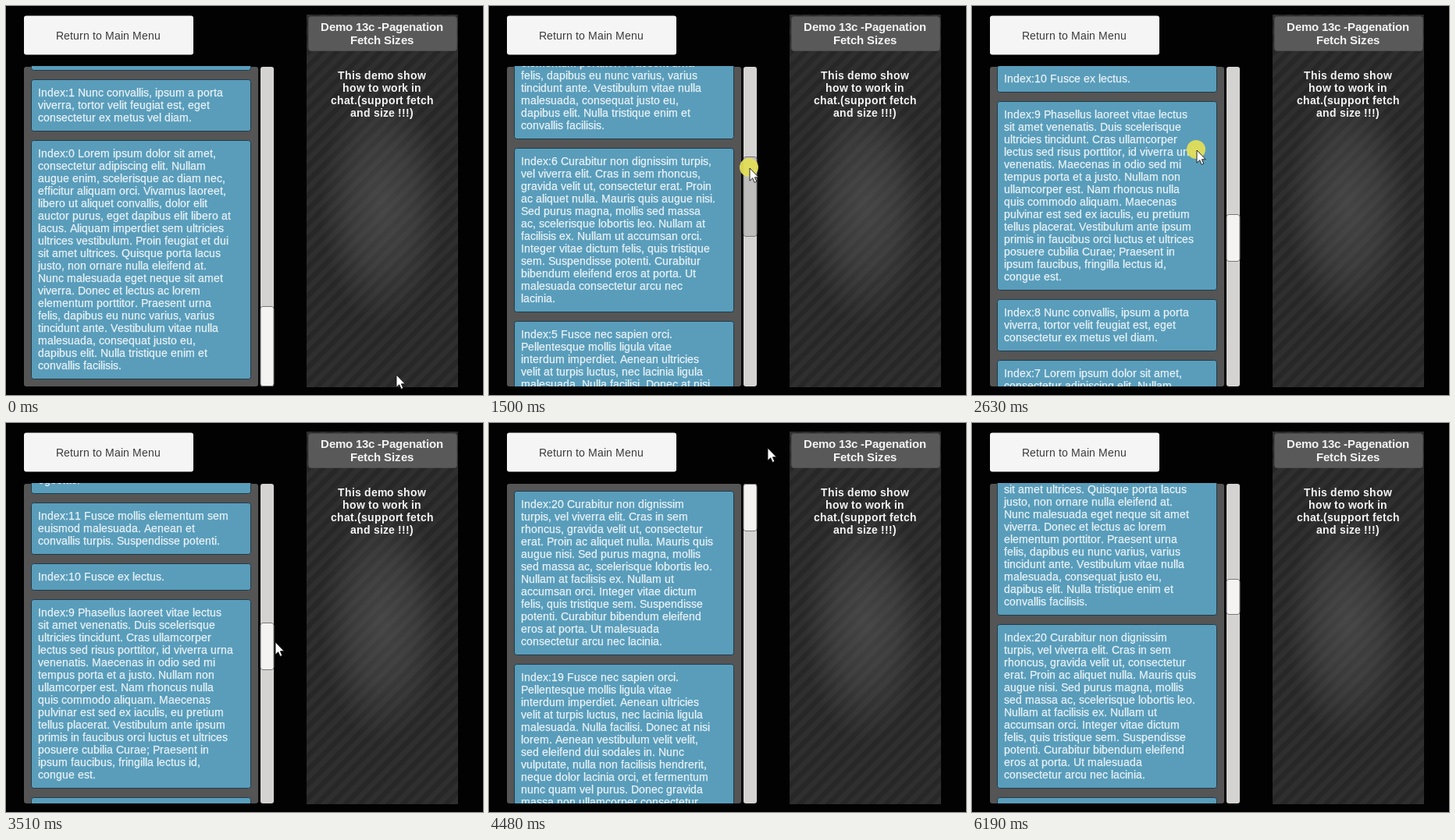
Write an HTML page that moves like this. It is 611 px wide and 499 px high and loops after 6.42 s.

```html
<!DOCTYPE html>
<html lang="en">
<head>
<meta charset="utf-8">
<title>Chat list with paged fetching</title>
<style>
  html, body { margin: 0; width: 100%; height: 100%; overflow: hidden; background: #020202; }
  svg { display: block; width: 611px; height: 499px; }
  text { font-family: "Liberation Sans", Arial, sans-serif; font-variant-ligatures: none; font-kerning: none; }
  .card rect { fill: #599dbb; stroke: #1f3c4a; }
  .card text { fill: #e9f2f6; stroke: #e9f2f6; stroke-width: .25; }
</style>
</head>
<body>
<svg id="stage" viewBox="0 0 611 499">
  <defs>
    <clipPath id="view"><rect x="23" y="77" width="300" height="411" rx="3"/></clipPath>
    <pattern id="stripes" width="13" height="13" patternUnits="userSpaceOnUse" patternTransform="rotate(-45)">
      <rect width="13" height="13" fill="#2f2f2f"/>
      <rect width="13" height="6.5" fill="#272727"/>
    </pattern>
    <radialGradient id="glow">
      <stop offset="0" stop-color="#666" stop-opacity=".46"/>
      <stop offset=".5" stop-color="#666" stop-opacity=".3"/>
      <stop offset="1" stop-color="#666" stop-opacity="0"/>
    </radialGradient>
  </defs>
  <rect width="611" height="499" fill="#020202"/>
  <rect x="23" y="12.5" width="217" height="50" rx="3" fill="#f5f5f5"/>

  <rect x="385" y="11" width="194" height="478" fill="url(#stripes)"/>
  <ellipse cx="482" cy="255" rx="80" ry="155" fill="url(#glow)"/>
  <rect x="387.5" y="13.5" width="190" height="44" rx="3" fill="#595959" stroke="#4c4c4c"/>

  <rect x="23" y="78" width="300" height="410" rx="3" fill="#555"/>
  <g clip-path="url(#view)"><g id="list"></g></g>

  <rect x="326" y="78" width="17" height="410" rx="3" fill="#d5d3d1"/>
  <rect id="handle" x="326" width="17" rx="3" stroke="#777"/>

  <g id="cursor">
    <circle id="press" cx="-1" cy="-1" r="12" fill="#e2de58" fill-opacity=".95"/>
    <path d="M0 0V16.2L3.7 12.8L6.2 18.4L8.8 17.2L6.4 11.8H11.3Z" fill="#fff" stroke="#111" stroke-width=".9"/>
  </g>
</svg>
<script>
const LOOP = 6420, STEP = 64, VIEW_TOP = 78, VIEW_H = 410, LINE = 16, WRAP = 250;
const FIRST_PAGE = 10, FETCH = 11;

const messages = [
  "Lorem ipsum dolor sit amet, consectetur adipiscing elit. Nullam augue enim, scelerisque ac diam nec, efficitur aliquam orci. Vivamus laoreet, libero ut aliquet convallis, dolor elit auctor purus, eget dapibus elit libero at lacus. Aliquam imperdiet sem ultricies ultrices vestibulum. Proin feugiat et dui sit amet ultrices. Quisque porta lacus justo, non ornare nulla eleifend at. Nunc malesuada eget neque sit amet viverra. Donec et lectus ac lorem elementum porttitor. Praesent urna felis, dapibus eu nunc varius, varius tincidunt ante. Vestibulum vitae nulla malesuada, consequat justo eu, dapibus elit. Nulla tristique enim et convallis facilisis.",
  "Nunc convallis, ipsum a porta viverra, tortor velit feugiat est, eget consectetur ex metus vel diam.",
  "Phasellus laoreet vitae lectus sit amet venenatis. Duis scelerisque ultricies tincidunt. Cras ullamcorper lectus sed risus porttitor, id viverra urna venenatis. Maecenas in odio sed mi tempus porta et a justo. Nullam non ullamcorper est. Nam rhoncus nulla quis commodo aliquam. Maecenas pulvinar est sed ex iaculis, eu pretium tellus placerat. Vestibulum ante ipsum primis in faucibus orci luctus et ultrices posuere cubilia Curae; Praesent in ipsum faucibus, fringilla lectus id, congue est.",
  "Fusce ex lectus.",
  "Fusce mollis elementum sem euismod malesuada. Aenean et convallis turpis. Suspendisse potenti.",
  "Fusce nec sapien orci. Pellentesque mollis ligula vitae interdum imperdiet. Aenean ultricies velit at turpis luctus, nec lacinia ligula malesuada. Nulla facilisi. Donec at nisi lorem. Aenean vestibulum velit velit, sed eleifend dui sodales in. Nunc vulputate, nulla non facilisis hendrerit, neque dolor lacinia orci, et fermentum nunc quam vel purus. Donec gravida massa non ullamcorper consectetur. Sed pellentesque leo ac ornare egestas.",
  "Curabitur non dignissim turpis, vel viverra elit. Cras in sem rhoncus, gravida velit ut, consectetur erat. Proin ac aliquet nulla. Mauris quis augue nisi. Sed purus magna, mollis sed massa ac, scelerisque lobortis leo. Nullam at facilisis ex. Nullam ut accumsan orci. Integer vitae dictum felis, quis tristique sem. Suspendisse potenti. Curabitur bibendum eleifend eros at porta. Ut malesuada consectetur arcu nec lacinia."
];

const $ = id => document.getElementById(id);
function set(node, attrs) {
  for (const key in attrs) node.setAttribute(key, attrs[key]);
  return node;
}
const add = (parent, tag, attrs) =>
  parent.appendChild(set(document.createElementNS("http://www.w3.org/2000/svg", tag), attrs));

// Glyph advances are rounded to whole pixels, as in a bitmap font atlas.
const pen = document.createElement("canvas").getContext("2d");
const advances = {};
function advance(ch, size, weight) {
  const key = ch + size + weight;
  if (!(key in advances)) {
    pen.font = `${weight} 1000px "Liberation Sans", Arial, sans-serif`;
    advances[key] = Math.round(pen.measureText(ch).width * size / 1000);
  }
  return advances[key];
}
function widthOf(str, size = 14, weight = "normal") {
  return [...str].reduce((sum, ch) => sum + advance(ch, size, weight), 0);
}
function write(parent, str, x, y, size = 14, weight = "normal", fill) {
  const xs = [];
  for (const ch of str) { xs.push(x); x += advance(ch, size, weight); }
  const node = add(parent, "text", { x: xs.join(" "), y, "font-size": size, "font-weight": weight });
  if (fill) node.setAttribute("fill", fill);
  node.textContent = str;
}
function writeCentred(str, cx, y, size, weight, fill) {
  write($("stage"), str, Math.floor(cx - widthOf(str, size, weight) / 2), y, size, weight, fill);
}
function wrap(str) {
  const lines = [];
  let line = "";
  for (const word of str.split(" ")) {
    const longer = line ? line + " " + word : word;
    if (widthOf(longer) <= WRAP) line = longer;
    else { lines.push(line); line = word; }
  }
  return [...lines, line];
}

writeCentred("Return to Main Menu", 131, 43, 14, "normal", "#3a3a3a");
["Demo 13c -Pagenation", "Fetch Sizes"].forEach((s, i) => writeCentred(s, 482, 32 + 17 * i, 15, "bold", "#f4f4f4"));
["This demo show", "how to work in", "chat.(support fetch", "and size !!!)"]
  .forEach((s, i) => writeCentred(s, 482, 94 + LINE * i, 14, "bold", "#f4f4f4"));
$("stage").append($("cursor"));

// Newer messages stack upwards from index 0.
const tops = [];
let listEnd;
for (let i = 0; i < FIRST_PAGE + 2 * FETCH; i++) {
  const lines = wrap(`Index:${i} ${messages[i % messages.length]}`);
  const height = lines.length * LINE + 17;
  if (i) tops[i] = tops[i - 1] - height - 13;
  else { tops[0] = 0; listEnd = height; }
  const card = add($("list"), "g", { class: "card", transform: `translate(0 ${tops[i]})` });
  add(card, "rect", { x: 32.5, y: -.5, width: 281, height: height + 1, rx: 3 });
  lines.forEach((line, k) => write(card, line, 41, 21 + k * LINE));
}
const rangeOf = count => listEnd - tops[count - 1] + 20 - VIEW_H;
const handleHeight = count => Math.round(102.5 * (FIRST_PAGE / count) ** .69);

// Pointer moves: start time, steps, x, y, what is being dragged.
const moves = [
  [30, 5, 233, 171], [350, 5, 347, 335], [690, 10, 334, 400],
  [1350, 6, 334, 16, "handle"], [1740, 2, 320, 21, "handle"],
  [2060, 3, 290, 150], [2380, 1, 290, 150, "list"], [2580, 4, 280, 289, "list"],
  [3150, 3, 312, 148], [3345, 3, 345, 281], [3540, 4, 337, 290],
  [3840, 6, 337, 204, "handle"], [4224, 4, 338, 40, "handle"], [4480, 1, 357, 32],
  [5220, 3, 290, 150], [5412, 4, 285, 321, "list"], [5668, 3, 506, 391], [5870, 6, 560, 510]
];

// Replays the gestures up to time t; pulling the list at its top fetches a page.
function stateAt(t) {
  let x = 500, y = 473, count = FIRST_PAGE, scroll = rangeOf(count), drag;
  for (const [start, steps, toX, toY, target] of moves) {
    if (t < start) break;
    const p = Math.min(1, (Math.floor((t - start) / STEP) + 1) / steps);
    const eased = target ? p : p * p;
    const dy = (toY - y) * eased;
    if (target === "handle") scroll += dy * rangeOf(count) / (VIEW_H - handleHeight(count));
    if (target === "list" && dy) {
      if (scroll <= 0) {
        scroll = tops[count - 1] - tops[count + FETCH - 1];
        count += FETCH;
      }
      scroll -= dy;
    }
    x += (toX - x) * eased;
    y += dy;
    drag = target;
  }
  return { x, y, count, drag, scroll: Math.round(Math.max(0, scroll)) };
}

function draw(t) {
  const { x, y, count, drag, scroll } = stateAt(t);
  const height = handleHeight(count);
  const top = VIEW_TOP + (VIEW_H - height) * scroll / rangeOf(count);
  set($("list"), { transform: `translate(0 ${VIEW_TOP + 10 - tops[count - 1] - scroll})` });
  set($("handle"), { y: Math.round(top) + .5, height: height - 1, fill: drag === "handle" ? "#bfbcbc" : "#f4f3f2" });
  set($("cursor"), { transform: `translate(${Math.round(x)} ${Math.round(y)})` });
  set($("press"), { visibility: drag ? "visible" : "hidden" });
}

const begin = performance.now();
function frame() {
  draw((performance.now() - begin) % LOOP);
  requestAnimationFrame(frame);
}
frame();
</script>
</body>
</html>
```
